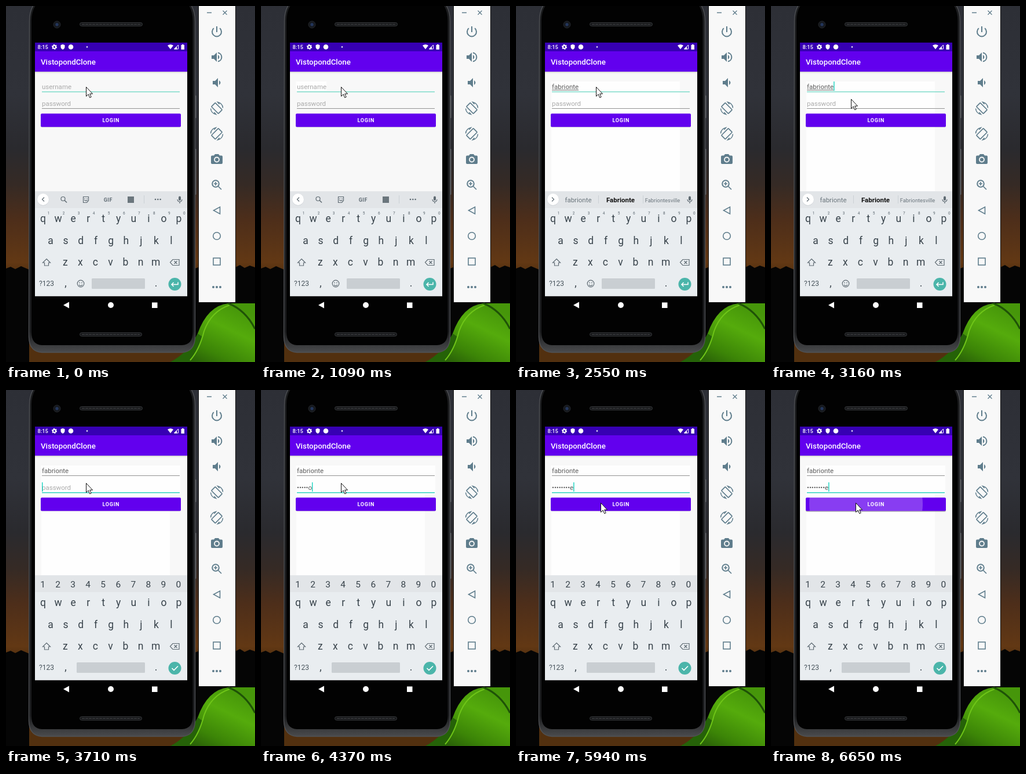
Animation of 430x613 px, one loop 8000 ms. Source, as an HTML page:

```html
<!DOCTYPE html>
<html lang="en">
<head>
<meta charset="utf-8">
<title>Login screen</title>
<style>
  html, body { margin: 0; width: 100%; height: 100%; overflow: hidden; background: #000; }
  svg { display: block; width: 430px; height: 613px; }
  text { font-family: Roboto, "Open Sans", sans-serif; white-space: pre; }
  .title { font-size: 13.3px; font-weight: 500; fill: #fff; }
  .field { font-size: 11.5px; fill: #5c5c5c; }
  .hint { fill: #aaa; }
  .button { font-size: 9px; font-weight: 700; letter-spacing: .75px; fill: #fff; }
  .key { font-size: 17.5px; fill: #37424a; text-anchor: middle; }
  .sup { font-size: 6.5px; fill: #59656d; text-anchor: middle; }
  .num { font-size: 15.5px; fill: #37424a; text-anchor: middle; }
  .word { font-size: 11.5px; fill: #6a757c; text-anchor: middle; }
  .line { fill: none; stroke: #5f6b73; stroke-width: 1.2; }
  .tool { fill: none; stroke: #5f7d8c; stroke-width: 2; }
  .solid { fill: #5f7d8c; stroke: none; }
</style>
</head>
<body>
<svg viewBox="0 0 430 613">
  <defs>
    <linearGradient id="sky" x2="0" y2="1">
      <stop offset="0" stop-color="#2d2f36"/>
      <stop offset=".25" stop-color="#303239"/>
      <stop offset=".4" stop-color="#2a2a2e"/>
      <stop offset=".5" stop-color="#352a25"/>
      <stop offset=".6" stop-color="#4d2e1a"/>
      <stop offset=".72" stop-color="#623814"/>
      <stop offset=".75" stop-color="#52300f"/>
    </linearGradient>
    <linearGradient id="tent" x1="0" y1="1" x2=".7" y2="0">
      <stop offset="0" stop-color="#1d4a08"/>
      <stop offset=".35" stop-color="#3c8507"/>
      <stop offset=".7" stop-color="#55ab0c"/>
      <stop offset="1" stop-color="#46960a"/>
    </linearGradient>
    <linearGradient id="rim" x2="0" y2="1">
      <stop offset="0" stop-color="#1c1d1f"/>
      <stop offset=".94" stop-color="#1c1d1f"/>
      <stop offset="1" stop-color="#4a4b4d"/>
    </linearGradient>
    <linearGradient id="shade" x2="0" y2="1">
      <stop offset="0" stop-color="#000" stop-opacity=".18"/>
      <stop offset="1" stop-color="#000" stop-opacity="0"/>
    </linearGradient>
    <clipPath id="btn"><rect x="60" y="185" width="242" height="23" rx="2"/></clipPath>
  </defs>

  <!-- night backdrop -->
  <rect width="430" height="613" fill="url(#sky)"/>
  <path d="M0 452L8 449L16 453L26 448L40 454V613H0ZM326 452L335 449L396 450L404 446L412 451L421 447L430 450V613H326Z" fill="#050505"/>
  <path d="M284 613Q316 596 331 564Q348 516 384 512H430V613Z" fill="url(#tent)"/>
  <path d="M284 613Q316 596 331 564L340 570Q330 596 318 613Z" fill="#256208"/>
  <path d="M318 610Q334 592 342 560Q354 526 386 515" fill="none" stroke="#6fc518" stroke-width="2"/>
  <path d="M384 512Q414 524 430 556" fill="none" stroke="#1f5207" stroke-width="3"/>

  <!-- phone body -->
  <rect x="325" y="154" width="3.500" height="39" rx="1" fill="#5a5c60"/>
  <rect x="325" y="246" width="3.500" height="79" rx="1" fill="#5a5c60"/>
  <path d="M49 -4Q40.500 8 40.500 26L39.500 570Q40 595 62 596.500H304Q326 595 326.500 570V26Q326.500 8 318 -4Z" fill="url(#rim)" stroke="#505256" stroke-width="1.300"/>
  <path d="M53 -4Q44 8 44 26V562Q44 583 62 584H304Q322.500 583 322.500 562V26Q322.500 8 314 -4Z" fill="#020202"/>
  <circle cx="88" cy="32" r="6" fill="#15181d" stroke="#25282d"/>
  <circle cx="88" cy="32" r="2.700" fill="#23365c"/>
  <g fill="#17181a" stroke="#36383b">
    <rect x="127.500" y="28.500" width="108" height="6" rx="3"/>
    <rect x="127.500" y="562.500" width="107" height="6" rx="3"/>
  </g>
  <path d="M131 31.500H232M131 565.500H231" stroke="#46484b" stroke-dasharray="5 1"/>
  <g fill="#fff">
    <path d="M99 515L109 509.500V520.500Z"/><circle cx="181" cy="515" r="5"/><rect x="252" y="510.500" width="9.500" height="9.500"/>
  </g>

  <!-- app -->
  <rect x="50" y="63" width="263" height="436.500" fill="#f8f8f8"/>
  <rect x="50" y="63" width="263" height="15" fill="#3700b3"/>
  <rect x="50" y="78" width="263" height="35" fill="#6200ee"/>
  <rect x="50" y="113" width="263" height="3" fill="url(#shade)"/>
  <text x="54.500" y="74" fill="#fff" font-size="9.300" font-weight="500">8:15</text>
  <g fill="#fff">
    <circle cx="83.500" cy="70.500" r="2.600" fill="none" stroke="#fff" stroke-width="2"/>
    <circle cx="83.500" cy="70.500" r="4" fill="none" stroke="#fff" stroke-width="1.300" stroke-dasharray="2 2.190"/>
    <path d="M98 66L101.500 67.300V70.500Q101.300 73.500 98 75Q94.700 73.500 94.500 70.500V67.300Z"/>
    <circle cx="112" cy="70.500" r="4.300"/>
    <circle cx="140" cy="70.500" r="1.200"/>
    <path d="M279 68Q284 64.500 289 68L284 74.500Z"/>
    <path d="M302.500 67H304V66H306.500V67H308V75H302.500Z"/>
    <path d="M290.500 74H297.500V67Z" fill="none" stroke="#fff"/>
    <path d="M290 74.500L295 69.500V74.500Z"/>
  </g>
  <text class="title" x="60" y="101">VistopondClone</text>

  <g fill="#fefefe">
    <rect id="patchA" x="60.500" y="130" width="52.500" height="16"/>
    <rect id="patchB" x="61" y="130" width="222" height="189"/>
    <rect id="patchC" x="60.500" y="130" width="240.500" height="50"/>
  </g>
  <rect id="userLine" x="62" width="238"/>
  <rect id="passLine" x="62" width="238"/>
  <text id="user" class="field" x="62" y="143"></text>
  <rect id="compose" x="62" y="144.300" height="1" fill="#666"/>
  <text id="pass" class="field" x="62" y="171.500"></text>
  <rect id="caret" width="1.400" height="16" fill="#19d3c0"/>

  <rect id="lift" x="60" y="186" width="242" height="24" rx="2.500" fill="#000" opacity=".2"/>
  <rect x="60" y="186" width="242" height="23" rx="2" fill="#000" opacity=".14"/>
  <rect x="60" y="185.300" width="242" height="22.900" rx="2" fill="#6200ee"/>
  <g clip-path="url(#btn)"><circle id="ripple" cx="164" cy="196" r="98" fill="#fff" opacity=".24"/></g>
  <text class="button" x="166.500" y="200.300">LOGIN</text>

  <!-- keyboard -->
  <rect x="50" y="319" width="263" height="180.500" fill="#e9edf0"/>
  <rect x="50" y="319" width="263" height="29" fill="#e2e5e8"/>
  <g id="strip">
    <circle cx="64" cy="333.500" r="10.300" fill="#ccd1d5"/>
    <circle cx="64" cy="333" r="10" fill="#fff"/>
    <path id="chevron" class="line" d="M2 -3.500L-1.500 0L2 3.500"/>
    <g fill="#5f6b73">
      <rect x="298" y="327.500" width="4" height="7.500" rx="2"/>
      <path class="line" d="M296 333Q296.500 337 300 337Q303.500 337 304 333M300 337V340"/>
    </g>
  </g>
  <g id="tools">
    <g class="line">
      <circle cx="98.500" cy="332" r="3.500"/><path d="M101 334.500L105 338.500" stroke-width="1.600"/>
      <path d="M133.500 328.500H142.500V335L139.500 338.500H133.500Z"/>
      <path d="M136 331V332.500M140 331V332.500M135.500 334Q138 337 140.500 334"/>
    </g>
    <text x="176.300" y="336.500" font-size="9" font-weight="700" fill="#5f6b73" text-anchor="middle" letter-spacing=".4">GIF</text>
    <rect x="210" y="328" width="11" height="11" fill="#6b767d"/>
    <path d="M238.500 326V340" stroke="#cbd1d5"/>
    <g fill="#5f6b73"><circle cx="258" cy="333" r="1.300"/><circle cx="262.300" cy="333" r="1.300"/><circle cx="266.600" cy="333" r="1.300"/></g>
  </g>
  <g id="words">
    <path d="M142.500 326V340M219.500 326V340" stroke="#cbd1d5"/>
    <text class="word" x="107.500" y="337.500">fabrionte</text>
    <text class="word" x="180.500" y="337.500" style="fill:#111;font-weight:700">Fabrionte</text>
    <text class="word" x="253" y="337.500" style="font-size:9.400px">Fabriontesville</text>
  </g>
  <g id="sups"></g>
  <g id="nums"></g>
  <g id="keys"></g>
  <g class="line">
    <path d="M70 435.500L76.500 442H73.500V447H66.500V442H63.500Z"/>
    <path d="M283.500 441.500L288 436.500H299V446.500H288ZM290.500 439L295.500 444M295.500 439L290.500 444"/>
  </g>
  <text x="70" y="482.300" font-size="12" fill="#46525a" text-anchor="middle">?123</text>
  <rect id="space" y="469" height="18" rx="1.500" fill="#c9ced2"/>
  <g id="smile" class="line">
    <circle cx="129" cy="478" r="5.800"/>
    <path d="M126 480Q129 483.500 132 480M127 475.500V477.500M131 475.500V477.500"/>
  </g>
  <circle cx="291.500" cy="479" r="11" fill="#4bb5aa"/>
  <path id="enter" d="M297 475.500V479.500H286.500M289.500 476L286 479.500L289.500 483" fill="none" stroke="#fff" stroke-width="1.500"/>
  <path id="check" d="M286.500 479L290 482.500L297 475.500" fill="none" stroke="#fff" stroke-width="1.700"/>

  <!-- side toolbar -->
  <rect x="332" y="-2" width="65" height="513" fill="#111"/>
  <rect x="333" y="-2" width="63" height="512" fill="#f8f8f8"/>
  <path d="M347 11.500H355M374.500 8L381.500 15M381.500 8L374.500 15" stroke="#5f7d8c" stroke-width="1.300"/>
  <g class="tool">
    <path d="M364 35V45M358.800 38.300A8 8 0 1 0 369.200 38.300"/>
    <g transform="translate(364 88)">
      <path class="solid" d="M-9 -3H-5L0 -8V8L-5 3H-9Z"/>
      <path class="solid" d="M2 -4Q7 0 2 4Z"/><path d="M2 -7.500A7.600 7.600 0 0 1 2 7.500"/>
    </g>
    <g transform="translate(364 132)">
      <path class="solid" d="M-7 -3H-3L2 -8V8L-3 3H-7Z"/><path class="solid" d="M4 -4Q9 0 4 4Z"/>
    </g>
    <g id="turn" transform="translate(364 176)">
      <rect x="-4.700" y="-8.500" width="9.400" height="17" rx="1" transform="rotate(-45)" stroke-width="1.700"/>
      <path d="M10.500 -.5Q10 -8.500 1.500 -10.500L4.500 -7M-10.500 .5Q-10 8.500 -1.500 10.500L-4.500 7" stroke-width="1.500"/>
    </g>
    <use href="#turn" transform="matrix(-1 0 0 1 728 44)"/>
    <path class="solid" d="M361 255H367L369 257.500H372Q374 257.500 374 259.500V270Q374 272 372 272H356Q354 272 354 270V259.500Q354 257.500 356 257.500H359Z"/>
    <circle cx="364" cy="264.500" r="4" fill="#5f7d8c" stroke="#f8f8f8" stroke-width="1.800"/>
    <circle cx="362" cy="306" r="5.800"/>
    <path d="M366.500 310.500L372 316M359 306H365M362 303V309" stroke-width="1.700"/>
    <path d="M358.500 352L369.500 346V358Z" stroke-width="1.600"/>
    <circle cx="364" cy="396" r="6.300" stroke-width="1.600"/>
    <rect x="358" y="434" width="12" height="12" stroke-width="1.600"/>
    <g class="solid"><circle cx="358" cy="484" r="2"/><circle cx="364" cy="484" r="2"/><circle cx="370" cy="484" r="2"/></g>
  </g>

  <path id="mouse" d="M.5 .5V16.500L4.200 13L6.700 18.800L9.200 17.700L6.700 12.200H11.500Z" fill="#fff" stroke="#111"/>
</svg>
<script>
const LOOP = 8000, NAME = 'fabrionte';
const $ = Object.fromEntries([...document.querySelectorAll('[id]')].map(e => [e.id, e]));
const set = (el, attrs) => { for (const k in attrs) el.setAttribute(k, attrs[k]); };
const show = (el, on) => el.setAttribute('visibility', on ? 'visible' : 'hidden');

// Each track lists [start, value...]; a value holds until the next start.
const userTrack = [[0, 0], [570, 1], [690, 0], [1340, 1], [1490, 3], [1610, 5], [1730, 7], [1880, 8], [2000, 9]];
const passTrack = [[0, 0], [3860, 1], [3980, 2], [4100, 3], [4220, 4], [4370, 6], [4490, 7], [4630, 8], [4750, 9]];
const caretTrack = [[0, 0], [150, 1], [1090, 0], [1340, 1], [2550, 0], [3040, 1], [5300, 0], [5820, 1]];
const mouseTrack = [[0, 138, 139], [2920, 138, 146], [3040, 138, 154], [3160, 138, 160],
  [5550, 139, 174], [5670, 141, 186], [5820, 145, 192], [5940, 146, 194]];
const at = (track, t) => track.findLast(step => step[0] <= t).slice(1);

function label(parent, cls, x, y, s) {
  const el = document.createElementNS('http://www.w3.org/2000/svg', 'text');
  set(el, { class: cls, x, y });
  el.textContent = s;
  parent.append(el);
}
function row(parent, cls, chars, x, y) {
  [...chars].forEach((c, i) => label(parent, cls, x + i * 26.05, y, c));
}
row($.keys, 'key', 'qwertyuiop', 64, 372);
row($.keys, 'key', 'asdfghjkl', 77, 409.5);
row($.keys, 'key', 'zxcvbnm', 102.3, 447);
label($.keys, 'key', 103, 483, ',');
label($.keys, 'key', 259, 483, '.');
row($.sups, 'sup', '1234567890', 73.5, 359);
row($.nums, 'num', '1234567890', 63.5, 339.5);

function fill(el, s, hint) {
  const shown = s || hint;
  if (el.textContent !== shown) el.textContent = shown;
  el.classList.toggle('hint', !s);
  return s ? el.getComputedTextLength() : 0;
}
function underline(el, y, active, color) {
  set(el, { y, height: active ? 1.5 : 1, fill: active ? color : '#929292' });
}

function render(t) {
  const [n] = at(userTrack, t), [m] = at(passTrack, t), [mx, my] = at(mouseTrack, t);
  const onPass = t >= 3310, numeric = t >= 3710, suggest = t >= 2000 && !numeric;

  const userW = fill($.user, NAME.slice(0, n), 'username');
  const passW = fill($.pass, m ? '•'.repeat(m - 1) + NAME[m - 1] : '', 'password');
  underline($.userLine, 147, !onPass, '#7fdccb');
  underline($.passLine, 176, onPass, '#2ed3c0');
  set($.compose, { width: userW });
  show($.compose, n && !onPass);
  set($.caret, { x: 62 + (onPass ? passW : userW), y: onPass ? 159 : 130 });
  show($.caret, at(caretTrack, t)[0]);

  show($.patchA, t >= 570);
  show($.patchB, t >= 2000);
  show($.patchC, t >= 3430);

  show($.strip, !numeric);
  show($.tools, !suggest && !numeric);
  show($.words, suggest);
  show($.sups, !numeric);
  show($.nums, numeric);
  show($.smile, !numeric);
  show($.enter, !numeric);
  show($.check, numeric);
  set($.chevron, { transform: `translate(64 333) scale(${suggest ? -1 : 1} 1)` });
  set($.space, numeric ? { x: 122, width: 118 } : { x: 148, width: 92 });

  show($.ripple, t >= 6650);
  show($.lift, t >= 6650);
  set($.mouse, { transform: `translate(${mx} ${my})` });
}

const start = performance.now();
function tick() {
  render((performance.now() - start) % LOOP);
  requestAnimationFrame(tick);
}
tick();
</script>
</body>
</html>
```
